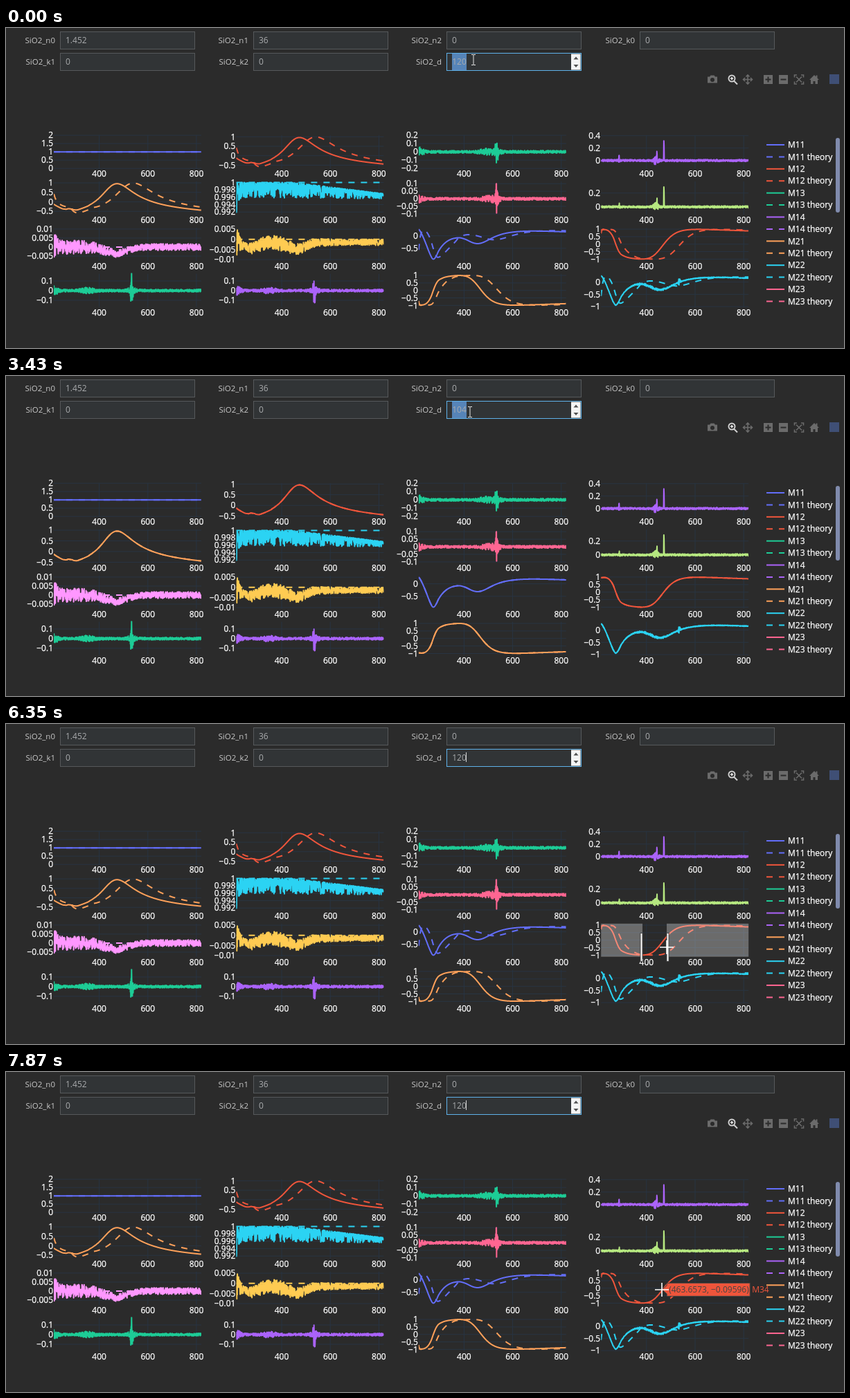
These frames come from a looping animation (1210 px wide and 463 px high, 8 s). An HTML page:

```html
<!DOCTYPE html>
<html>
<head>
<meta charset="utf-8">
<style>
  html, body { margin: 0; width: 100%; height: 100%; overflow: hidden; background: #2b2b2b; }
  svg { display: block; width: 1210px; height: 463px; font: 12px "Open Sans", "Noto Sans", sans-serif; }
  .line { fill: none; stroke-width: 2; stroke-linejoin: round; }
  .dash { stroke-dasharray: 9 9; }
  .tick { fill: #fff; stroke: #fff; stroke-width: .25; }
  .grid { stroke: #283442; fill: none; }
  .end { text-anchor: end; }
  .mid { text-anchor: middle; }
  .label { fill: #c9c9c9; font-size: 11.5px; }
  .value { fill: #a9abad; }
  .icon { fill: none; stroke: #6b6b6b; stroke-width: 1.6; }
  .solid { fill: #6b6b6b; fill-rule: evenodd; stroke: none; }
</style>
</head>
<body>
<svg viewBox="0 0 1210 463"><g id="form"></g><g id="plots"></g><g id="legend"></g><g id="top"></g></svg>
<script>
const LOOP = 8000, DX = 0.8, FULL = [213, 820], ZOOM = [384, 481.6];
const WIDTH = 213, HEIGHT = 48, LEFT = 69, TOP = 155.2, PITCH_X = 263.4, PITCH_Y = 66.8;
const COLORS = ['#636efa', '#ef553b', '#1dcc96', '#ab63fa', '#ffa15a',
                '#2bd3f3', '#ff6692', '#b6e880', '#ff97ff', '#fecb52'];
const el = id => document.getElementById(id);
const rect = (x, y, w, h, attrs = '') => `<rect x="${x}" y="${y}" width="${w}" height="${h}" ${attrs}/>`;
const text = (x, y, s, cls, attrs = '') => `<text x="${x}" y="${y}" class="${cls}" ${attrs}>${s}</text>`;
const path = (d, attrs) => `<path d="${d}" ${attrs}/>`;
const minus = v => String(v).replace('-', '−');

// --- thin film optics: SiO2 layer on silicon, light at 70 degrees ---------
const add = ([a, b], [c, d]) => [a + c, b + d];
const sub = ([a, b], [c, d]) => [a - c, b - d];
const mul = ([a, b], [c, d]) => [a * c - b * d, a * d + b * c];
const div = (p, [c, d]) => mul(p, [c / (c * c + d * d), -d / (c * c + d * d)]);
const sqrt = ([a, b]) => {
  const r = Math.sqrt(Math.hypot(a, b)), w = Math.atan2(b, a) / 2;
  return [r * Math.cos(w), r * Math.sin(w)];
};

// wavelength, n, k
const SILICON = [[207, 1.01, 2.91], [225, 1.34, 3.3], [248, 1.57, 3.57], [264, 1.77, 4.1], [275.5, 2.45, 5.08],
  [288, 4.09, 5.4], [295, 4.89, 4.64], [310, 5.01, 3.59], [354, 5.61, 3.01], [365, 6.52, 2.71], [376, 6.71, 1.32],
  [387, 6.06, .63], [413, 5.22, .27], [496, 4.32, .07], [620, 3.91, .02], [827, 3.67, .01]];

function silicon(x) {
  const last = SILICON.length - 1, i = Math.min(SILICON.findIndex(p => p[0] >= x), last) - 1;
  const knot = j => SILICON[Math.max(0, Math.min(last, j))];
  const h = knot(i + 1)[0] - knot(i)[0], t = (x - knot(i)[0]) / h, u = 1 - t;
  const blend = c => {
    const slope = j => (knot(j + 1)[c] - knot(j - 1)[c]) / (knot(j + 1)[0] - knot(j - 1)[0]);
    return knot(i)[c] * u * u * (1 + 2 * t) + knot(i + 1)[c] * t * t * (3 - 2 * t) +
      h * t * u * (u * slope(i) - t * slope(i + 1));
  };
  return [blend(1), -blend(2)];
}

function film(x, d) {
  const angle = 70 * Math.PI / 180;
  const n = [[1, 0], [1.452 + 3600 / x ** 2, 0], silicon(x)];
  const cos = n.map(m => {
    const s = div([Math.sin(angle), 0], m);
    return sqrt(sub([1, 0], mul(s, s)));
  });
  const phase = 4 * Math.PI * d * n[1][0] * cos[1][0] / x, turn = [Math.cos(phase), -Math.sin(phase)];
  const ratio = (a, b) => div(sub(a, b), add(a, b));
  const total = edge => {
    const a = edge(0, 1), b = mul(edge(1, 2), turn);
    return div(add(a, b), add([1, 0], mul(a, b)));
  };
  const rs = total((i, j) => ratio(mul(n[i], cos[i]), mul(n[j], cos[j])));
  const rp = total((i, j) => ratio(mul(n[j], cos[i]), mul(n[i], cos[j])));
  const [re, im] = div(rp, rs), size = re * re + im * im;
  return { n: (size - 1) / (size + 1), c: 2 * re / (1 + size), s: 2 * im / (1 + size) };
}

// --- measured noise -------------------------------------------------------
const rnd = (x, seed) => {
  const v = Math.sin(Math.round(x / DX) * 12.9898 + seed * 78.233) * 43758.5453;
  return (v - Math.floor(v)) * 2 - 1;
};
const bump = (x, c, w) => Math.exp(-(((x - c) / w) ** 2));
const burst = (seed, peak, mid) => x => peak * rnd(x, seed) *
  (.09 + .25 * bump(x, 213, 20) + .15 * bump(x, mid, 30) + .15 * bump(x, 534, 20) + bump(x, 534, 5));
const spikes = (seed, k) => x => k * (rnd(x, seed) * (.017 + .04 * bump(x, 287, 3) + .06 * bump(x, 438, 12)) +
  .04 * bump(x, 287, 1) + .14 * bump(x, 443, 1) + .37 * bump(x, 471.7, .8));
const dips = x => {
  const ramp = Math.max(0, (x - 450) / 370), r = rnd(x, 5);
  return 1 - .003 * ramp - r * r * (.0042 - .0028 * ramp + .004 * bump(x, 213, 12));
};
const drift = x => -.0035 * bump(x, 470, 60) +
  rnd(x, 8) * (.0018 + .0022 * bump(x, 270, 150) + .005 * bump(x, 213, 12));
const sag = x => -.0015 - .003 * bump(x, 275, 40) - .0035 * bump(x, 460, 50) +
  rnd(x, 9) * (.0015 + .002 * bump(x, 380, 150) + .005 * bump(x, 213, 15));
const rough = x => rnd(x, 16) * (.012 + .04 * bump(x, 420, 70) + .14 * bump(x, 535, 5));

// measured(x), theory(x, d), tick step, value range when not automatic
const noise = (f, step, range, level = 0) => [f, () => level, step, range];
const optic = (key, sign = 1, extra = () => 0) => {
  const theory = (x, d) => sign * film(x, d)[key];
  return [x => theory(x, 104) + extra(x), theory, .5];
};
const PLOTS = [
  noise(() => 1, .5, [0, 2], 1), optic('n'), noise(burst(2, .18, 490), .1, [-.2, .2]), noise(spikes(3, 1), .2, [-.128, .406]),
  optic('n'), noise(dips, .002, [.9913, 1.0003], 1), noise(burst(6, .1, 500), .05, [-.105, .115]), noise(spikes(7, .88), .2, [-.112, .368]),
  noise(drift, .005, [-.0076, .0108]), noise(sag, .005, [-.0106, .0058]), optic('c'), optic('s'),
  noise(burst(12, .15, 350), .1, [-.169, .174]), noise(burst(13, .15, 350), .1, [-.169, .174]), optic('s', -1), optic('c', 1, rough)
];

// --- timelines ------------------------------------------------------------
const VIEWS = [[0, FULL, 120], [2220, FULL, 104], [5440, FULL, 120], [6730, ZOOM, 120], [7870, FULL, 120]];
const TYPED = [[0, '120', true], [400, '1'], [680, '10'], [800, '104'], [3430, '104', true],
  [3820, '1'], [4070, '12'], [4380, '120']];
const CARET_TOGGLES = [400, 1450, 2220, 2480, 3020, 3430, 3820, 4810, 5560, 5960, 6350, 6850, 7370];
// start, end, x, y of each pointer move
const MOVES = [[0, 0, 675, 46], [2760, 2760, 688, 61], [2900, 3020, 670, 52], [4690, 5180, 939, 305],
  [5320, 5320, 926, 323], [5440, 5440, 928, 323], [5840, 5840, 919, 323], [5960, 6080, 946, 323],
  [6350, 6350, 954, 323], [6730, 6730, 953, 322], [7250, 7250, 960, 322], [7370, 7490, 953, 315], [7870, 7870, 947, 315]];
const HOVERS = [[0], [5560, 410.2184], [5840], [6730, 427.5129, -.73944], [7250, 430.6571],
  [7490, 427.5129, -.73944], [7870, 463.6573, -.09596]];
const at = (list, t) => list.findLast(e => e[0] <= t);

function pointer(t) {
  const i = MOVES.findLastIndex(m => m[0] <= t), [start, end, x, y] = MOVES[i];
  const [, , x0, y0] = MOVES[Math.max(0, i - 1)];
  const steps = Math.round((end - start) / 122) + 1;
  const p = Math.min(1, (Math.floor((t - start) / 122) + 1) / steps);
  return [x0 + (x - x0) * p, y0 + (y - y0) * p];
}

// --- fixed parts ----------------------------------------------------------
function drawForm() {
  const values = { n0: '1.452', n1: 36, n2: 0, k0: 0, k1: 0, k2: 0, d: '' };
  const fields = Object.entries(values).map(([name, value], i) => {
    const x = 78 + 279 * (i % 4), y = i < 4 ? 5 : 36;
    return text(x - 7, y + 17, 'SiO2_' + name, 'label end') +
      rect(x + .5, y + .5, 194, 25, `fill="#313436" stroke="${name === 'd' ? '#5fb2ea' : '#56595b'}"`) +
      text(x + 8, y + 17, value, 'value');
  });
  const icon = (x, d, cls = '', attrs = '') => path(d, `class="icon ${cls}" transform="translate(${x} 74.5)" ${attrs}`);
  const box = 'M-6.5-6.5h13v13h-13z';
  el('form').innerHTML = fields.join('') +
    rect(816, 37.5, 13.5, 23, 'fill="#f4f4f4"') +
    path('M819.5 45.5l3.5-4 3.5 4zM819.5 53l3.5 4 3.5-4z', 'fill="#505050"') +
    icon(1020, 'M-7-4h3l1.5-2h5l1.5 2h3v9h-14zM3 .5a3 3 0 1 1-6 0a3 3 0 1 1 6 0z', 'solid') +
    icon(1049, 'M3.5-1.5a4.5 4.5 0 1 1-9 0a4.5 4.5 0 1 1 9 0zM2 2l5 5M-3-1.5h4M-1-3.5v4', '', 'style="stroke:#d0d0d0;stroke-width:2"') +
    icon(1071, 'M-6 0h12M0-6v12M-4-2.5l-2.5 2.5 2.5 2.5M4-2.5l2.5 2.5-2.5 2.5M-2.5-4l2.5-2.5 2.5 2.5M-2.5 4l2.5 2.5 2.5-2.5') +
    icon(1100.5, box + 'M-1-4v3h-3v2h3v3h2v-3h3v-2h-3v-3z', 'solid') +
    icon(1122.5, box + 'M-4-1v2h8v-2z', 'solid') +
    icon(1145, 'M-6.5-3v-3.5h3.5M3-6.5h3.5v3.5M6.5 3v3.5h-3.5M-3 6.5h-3.5v-3.5M-4-4l8 8M4-4l-8 8') +
    icon(1167, 'M-7 .5L0-6.5l2.5 2.5v-2h2v4l2.5 2.5h-2v6h-3.5v-4h-3v4h-3.5v-6z', 'solid') +
    rect(1189, 67, 14, 14, 'fill="#3f4f75"');
}

function drawLegend() {
  let s = rect(1198, 159, 6, 108, 'rx="3" fill="#808bad"');
  for (let i = 0; i < 14; i++) {
    const k = i >> 1, y = 169 + i * 17.42, name = 'M' + (1 + (k >> 2)) + (1 + k % 4);
    s += path(`M1098 ${y}H1124`, `class="line ${i % 2 ? 'dash' : ''}" stroke="${COLORS[k]}"`) +
      text(1129, y + 4.2, name + (i % 2 ? ' theory' : ''), 'tick');
  }
  el('legend').innerHTML = s;
}

// --- charts ---------------------------------------------------------------
const WAVES = Array.from({ length: Math.floor((FULL[1] - FULL[0]) / DX) + 1 }, (_, i) => FULL[0] + i * DX);

function autoRange(values) {
  const lo = Math.min(...values), hi = Math.max(...values), pad = (hi - lo) / 18;
  return [lo - pad, hi + pad];
}

function drawPlots([, [lo, hi], thickness]) {
  const gap = lo === FULL[0] ? 200 : 20, ticksX = [];
  for (let x = 400; x < hi; x += gap) ticksX.push(x);
  el('plots').innerHTML = PLOTS.map(([measured, theory, step, range], i) => {
    const left = LEFT + PITCH_X * (i % 4), top = TOP + PITCH_Y * (i >> 2), bottom = top + HEIGHT;
    const data = WAVES.map(measured), model = WAVES.map(x => theory(x, thickness));
    const [min, max] = range || autoRange(data.concat(model));
    const px = x => left + (x - lo) / (hi - lo) * WIDTH, py = v => bottom - (v - min) / (max - min) * HEIGHT;
    const ticks = [];
    for (let k = Math.ceil(min / step - 1e-6); k * step <= max + 1e-6; k++) ticks.push(+(k * step).toFixed(4));
    const trace = (values, cls) => {
      const points = values.map((v, j) => [WAVES[j], v]).filter(([x]) => x > lo - 1 && x < hi + 1);
      return path('M' + points.map(([x, v]) => `${px(x).toFixed(2)} ${py(v).toFixed(2)}`).join('L'),
        `class="line ${cls}" stroke="${COLORS[i % 10]}"`);
    };
    const grid = ticksX.map(x => `M${px(x)} ${top}V${bottom}`).concat(ticks.map(v => `M${left} ${py(v)}h${WIDTH}`));
    return `<clipPath id="c${i}">${rect(left, top - 1, WIDTH, HEIGHT + 2)}</clipPath>` +
      path(grid.join(''), 'class="grid"') +
      `<g clip-path="url(#c${i})">${trace(data, '')}${trace(model, 'dash')}</g>` +
      ticksX.map(x => text(px(x), bottom + 12.2, x, 'tick mid')).join('') +
      ticks.map(v => text(left - 1, py(v) + 4.2, minus(v), 'tick end')).join('');
  }).join('');
}

// --- input text, drag box, hover label, pointer ---------------------------
const SHAPES = {
  beam: path('M-3-7.5h2.5l.5.5.5-.5h2.5M0-7v14M-3 7.5h2.5l.5-.5.5.5h2.5', 'fill="none" stroke="#e8e8e8"'),
  cross: path('M-10 0h20M0-10v20', 'fill="none" stroke="#fff" stroke-width="1.6"'),
  arrow: path('M0 0v15l3.5-3.2 2.3 5.2 2.2-1-2.3-5h4.8z', 'fill="#fff" stroke="#000"'),
  resize: path('M-10 0l5-5v3.5h10v-3.5l5 5-5 5v-3.5h-10v3.5z', 'fill="#fff" stroke="#000"')
};

function drawTop(t) {
  const [, typed, selected] = at(TYPED, t), [mx, my] = pointer(t), [, [lo, hi]] = at(VIEWS, t);
  const left = LEFT + PITCH_X * 3, top = TOP + PITCH_Y * 2, caret = CARET_TOGGLES.filter(c => c <= t).length % 2;
  let s = selected ? rect(644, 37, 21, 24, 'fill="#5684b8"') : '';
  s += text(644.2, 53, typed, 'value');
  if (caret) s += rect(Math.floor(644.2 + 6.8 * typed.length), 41, 1, 14, 'fill="#d8d8d8"');

  if (t >= 5960 && t < 6730) {
    const start = 919, shade = 'fill="#fff" fill-opacity=".3"', handle = 'fill="#fff" stroke="#444"';
    s += rect(left, top, start - left, HEIGHT, shade) + rect(mx, top, left + WIDTH - mx, HEIGHT, shade) +
      rect(start - 3, 302.5, 3, 41, handle) + rect(mx, 302.5, 3, 41, handle);
  }

  const [, wave, value = wave && film(wave, 104).s] = at(HOVERS, t);
  if (wave) {
    const x = left + (wave - lo) / (hi - lo) * WIDTH, y = top + HEIGHT / 2 - 21.6 * value;
    s += path(`M${x} ${y}l7-6v-3.5h120v19h-120v-3.5z`, 'fill="#ef553b" stroke="#444"') +
      text(x + 10, y + 4.2, `(${wave.toFixed(4)}, ${minus(value.toFixed(5))})`, '', 'fill="#444"') +
      text(x + 130, y + 4.2, 'M34', '', 'fill="#ef553b"');
  }

  const shape = my < 62 ? 'beam' : t >= 5320 && t < 5440 ? 'resize' : mx < 890 ? 'arrow' : 'cross';
  el('top').innerHTML = s + `<g transform="translate(${mx} ${my})">${SHAPES[shape]}</g>`;
}

let begin, view;
function frame(now) {
  begin ??= now;
  const t = (now - begin) % LOOP, next = at(VIEWS, t);
  if (next !== view) drawPlots(view = next);
  drawTop(t);
  requestAnimationFrame(frame);
}
drawForm();
drawLegend();
requestAnimationFrame(frame);
</script>
</body>
</html>
```
